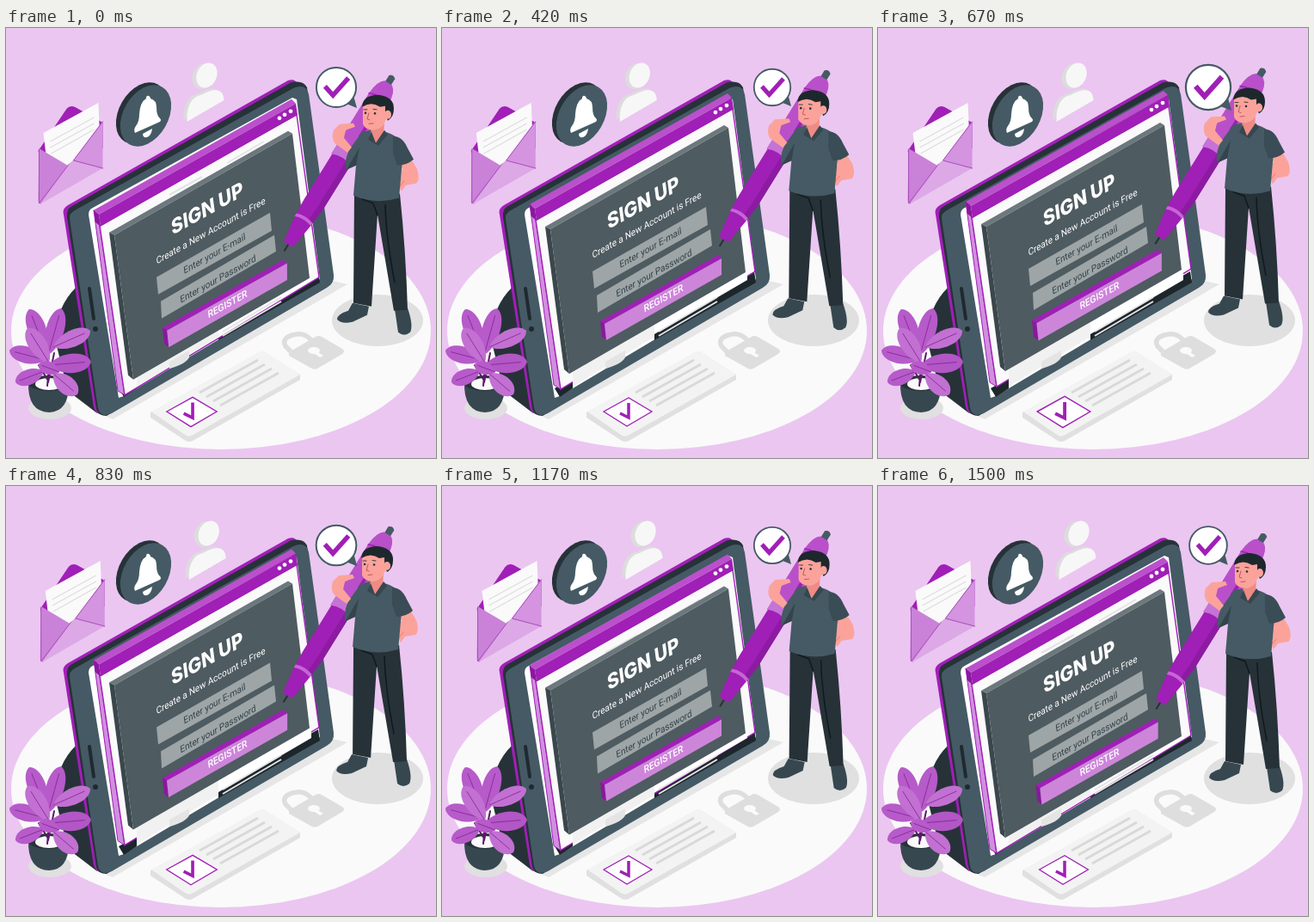
An HTML page for the animation above (1540 ms loop, 500 by 500 pixels).

```html
<!DOCTYPE html>
<html lang="en">
<head>
<meta charset="utf-8">
<title>Sign up</title>
<style>
html, body { margin: 0; width: 100%; height: 100%; overflow: hidden; background: #ebc6f1; }
svg { display: block; width: 100vw; height: 100vh; }
text { font-family: Roboto, sans-serif; font-size: 11px; fill: #fff; text-anchor: middle; }
.line { fill: none; stroke-linecap: round; stroke-linejoin: round; }
.purple { fill: #a01fb6; }
.dark { fill: #263238; }
.slate { fill: #455a64; }
.skin { fill: #fba39b; }
</style>
</head>
<body>
<svg viewBox="0 0 500 500">
  <rect width="500" height="500" fill="#ebc6f1"/>
  <ellipse cx="250" cy="352" rx="244" ry="138" fill="#fafafa"/>

  <g fill="#e0e0e0">
    <path d="M112 450 376 293 397 298 124 455Z" fill="#e6e6e6"/>
    <ellipse cx="432" cy="340" rx="53" ry="30"/>
    <ellipse cx="51" cy="442" rx="25" ry="13"/>
  </g>

  <!-- padlock -->
  <path d="M333 378 325 370Q320 361 333 357 345 353 353 361L361 368" class="line" stroke="#dedede" stroke-width="5.500"/>
  <path d="M329 377 360 359Q363 357 367 359L391 373Q395 376 391 379L362 396Q358 398 354 395L329 381Z" fill="#dedede"/>
  <ellipse cx="358" cy="375" rx="7" ry="4" fill="#fafafa"/>
  <path d="M360 375 369 381 365 383 356 377Z" fill="#fafafa"/>

  <!-- floor card -->
  <path d="M168 447 298 376 342 403V409L217 480Q213 482 209 480L168 453Z" fill="#e0e0e0"/>
  <path d="M169 446 294 377Q298 375 302 377L342 403 216 474Q212 476 208 473Z" fill="#f3f3f3"/>
  <g id="cardLines" stroke="#d9d9d9" stroke-width="3"></g>
  <g id="tickBox">
    <path d="M188 446 217 430 244 446 215 463Z" fill="#fff" stroke="#a01fb6" stroke-width="1.3"/>
    <path d="M207 448 217 453V436" fill="none" stroke="#a01fb6" stroke-width="3.5"/>
  </g>

  <!-- tablet -->
  <path d="M82 301Q58 324 57 362L72 422 106 448Z" class="dark"/>
  <path d="M67 217Q65 210 72 206L328 61Q336 58 340 66L345 80 116 450Q104 450 102 441Z" class="purple"/>
  <path d="M71 220Q70 211 76 207.500L331 63.500Q345 60 350 69L378 290 117 451Q107 451 105 443Z" class="dark"/>
  <path d="M74 222Q73 216 80 212L334 70Q349 64 352 77L381 287Q382 297 373 302L123 448Q110 454 107 442Z" class="slate"/>
  <path d="M97 303 102 338" class="line" stroke="#1f2a30" stroke-width="4"/>
  <circle cx="104" cy="350" r="3" fill="#1f2a30"/>
  <path d="M96 217Q96 211 101 209L333 81 338 83 365 292 137 428 131 430Z" fill="#fff"/>
  <path d="M131 419 152 407V419L137 429ZM247 350 363 283 365 296 247 363Z" fill="#1c262b"/>

  <g id="window">
    <path d="M102 212 109 230 138 427 130 422Z" fill="#d18fdf" stroke="#a01fb6"/>
    <path d="M109 230 338 101 364 290 138 427Z" fill="#fafafa" stroke="#a01fb6" stroke-width="1.4"/>
    <path d="M102 212 332 83 337 88 108 217Z" fill="#bb50cc"/>
    <path d="M108 217 337 88 339 101 110 231Z" class="purple"/>
    <path d="M102 212 108 217 110 231 104 226Z" fill="#8a189e"/>
    <g fill="#fff"><circle cx="318" cy="105" r="2.4"/><circle cx="324" cy="101" r="2.4"/><circle cx="331" cy="97" r="2.4"/></g>
  </g>
  <path d="M152 396 247 342V359L152 417Z" fill="#f1f1f1"/>
  <path d="M247 342 355 280V293L247 356Z" fill="#fff"/>
  <path d="M190 388 213 375V383Q209 391 190 396Z" fill="#e4e4e4"/>
  <path d="M257 157 300 132M190 194 228 173M252 353 320 313M252 358 320 318" stroke="#e4e4e4" stroke-width="2"/>

  <g id="panel">
    <path d="M120 238 328 120 333 123 126 241Z" fill="#6c787d"/>
    <path d="M120 238 126 241 148 409 142 404Z" fill="#3a474d"/>
    <path d="M126 241 333 123 353 291 148 409Z" fill="#4e5b60"/>
    <path d="M175 290 307 215 309 236 177 310ZM180 318 312 241 314 260 181 338Z" fill="#9da5a7"/>
    <g id="button">
      <path d="M184 348 321 271 325 275 189 351Z" class="purple"/>
      <path d="M184 348 189 351 191 370 186 366Z" fill="#8a189e"/>
      <path d="M189 351 325 275V294L191 370Z" fill="#cd85da"/>
    </g>
    <g id="labels"></g>
  </g>

  <!-- plant -->
  <path d="M26 412Q25 446 50 447 74 446 73 412Z" fill="#37474f"/>
  <ellipse cx="49.500" cy="413" rx="23.500" ry="9" class="dark"/>
  <ellipse cx="50" cy="414" rx="16" ry="7" fill="#fafafa"/>
  <path d="M48 416Q51 395 47 373M49 412 56 378M49 410 38 392" class="line" stroke="#5b1a68" stroke-width="2"/>
  <g id="leaves"></g>

  <!-- icons -->
  <g id="mail">
    <path d="M37 143 70 94Q74 89 80 92L112 110V140L45 170Z" class="purple"/>
    <path d="M43 122 107 87 109 134 76 164 47 156Z" fill="#fafafa"/>
    <path d="M51 132 102 104M51 139 102 111M52 146 102 118" stroke="#dedede" stroke-width="1.400"/>
    <path d="M38 140 75 162 40 205Q37 204 37 200Z" fill="#ca82d8"/>
    <path d="M112 108 76 156 112 164Z" fill="#d494e0"/>
    <path d="M39 205 74 157Q77 153 81 155L112 163Z" fill="#dca8e6"/>
    <path d="M38 141V204L73 158M112 109 78 154 112 163" class="line" stroke="#aa4dbd" stroke-width="1"/>
  </g>
  <ellipse cx="157.500" cy="99" rx="26" ry="38.500" transform="rotate(30 157.500 99)" class="dark"/>
  <ellipse cx="162.500" cy="102" rx="26" ry="38.500" transform="rotate(30 162.500 102)" class="slate"/>
  <path d="M150 122Q148 118 151 114 155 109 155 100 156 86 163 82 163 78 166 79 168 80 168 82 175 84 175 92 175 102 179 105 181 107 179 109ZM159 123 170 117Q169 125 164 127 159 128 159 123Z" fill="#fff"/>
  <g id="user">
    <g fill="#dcdcdc"><ellipse cx="229" cy="56" rx="12.500" ry="15.500" transform="rotate(24 229 56)"/><path d="M206 107V99Q209 78 224 76 248 62 250 82Z"/></g>
    <g fill="#f7f7f7"><ellipse cx="233" cy="55" rx="11.500" ry="15" transform="rotate(24 233 55)"/><path d="M210 109V101Q212 81 226 78 252 64 253 84Z"/></g>
  </g>

  <g id="man">
    <g transform="translate(325 257) rotate(-58.200)">
      <path d="M-3-1H9V1H-3Z" class="dark"/>
      <path d="M225-4H235Q239 0 235 4H225Z" class="slate"/>
      <path d="M6-4Q7-7 10-7L40-11 60-12H130V13H60L40 11 10 7Q6 6 6 4Z" class="purple"/>
      <path d="M42 5 60 6H130V13H60L42 11Z" fill="#8c1ba1"/>
      <path d="M38-11Q42 0 38 11H42Q46 0 42-11Z" fill="#c765d6"/>
      <path d="M122-13H206Q222-12 227-5V5Q222 13 206 13H122Q128 0 122-13Z" fill="#b950ca"/>
      <path d="M122-13H136Q142 0 136 13H122Q128 0 122-13Z" fill="#c573d4"/>
      <path d="M157 5H208" class="line" stroke="#a01fb6" stroke-width="4"/>
      <path d="M205-13Q211 0 205 13" class="line" stroke="#a01fb6" stroke-width="1.500"/>
    </g>
    <path d="M403 320 422 324 420 334 403 342Q390 345 385 339 385 333 398 329Z" fill="#37474f"/>
    <path d="M452 327 467 326Q474 346 470 354 463 360 456 354Z" fill="#37474f"/>
    <path d="M405 193H458Q465 260 467 328L451 329 432 217 425 324 404 320Z" class="dark"/>
    <path d="M432 218 427 204 414 199M441 206Q442 245 452 296" class="line" stroke="#10191d" stroke-width="1.500"/>
    <path d="M457 156 470 151 478 164Q482 177 477 181L465 183 460 190 457 185 453 189 451 185 446 186 448 177 455 171 452 163 456 160 462 167Z" class="skin"/>
    <path d="M453 184 459 177M458 184 463 178" class="line" stroke="#df7e79"/>
    <path d="M414 121 426 119 440 121Q457 124 462 142L457 198Q430 206 404 195L407 160 396 165Q392 158 399 142Z" class="slate"/>
    <path d="M407 160 411 139 396 165Z" fill="#33444c"/>
    <path d="M450 126Q461 126 467 140L474 153Q466 160 455 160L450 146Z" fill="#3a4c55"/>
    <path d="M397 145 382 134Q378 127 381 119L388 112 404 111 406 115 395 119 393 128 402 139Z" class="skin"/>
    <path d="M425 113 440 108 439 124 430 134 424 126Z" fill="#ee8b85"/>
    <path d="M425 121 430 134 440 119 444 124 433 137 421 130Z" fill="#37474f"/>
    <path d="M415 87 445 87 448 98 441 108Q439 117 428 119 418 119 415 112Z" class="skin"/>
    <path d="M414 92Q415 78 433 78 451 80 451 94 451 104 444 108L441 101 441 91 435 92Q425 85 414 92Z" fill="#1d282d"/>
    <ellipse cx="444" cy="101" rx="4" ry="5" class="skin"/>
    <path d="M416 95 420 95M427 94.500 431 95" class="line" stroke="#263238" stroke-width=".9"/>
    <circle cx="418" cy="99" r="1.300" class="dark"/><circle cx="429" cy="99.500" r="1.300" class="dark"/>
    <path d="M422 99 420 106 423 107M422 111.500 427 111" class="line" stroke="#b74f58" stroke-width=".9"/>
  </g>

  <g id="bubble">
    <path d="M396 87 406 91 403 80Z" class="slate"/>
    <circle cx="384" cy="69" r="21.200" fill="#fff" stroke="#455a64" stroke-width="1.800"/>
    <path d="M372 68 380.500 77.500 397 59" fill="none" stroke="#a01fb6" stroke-width="5"/>
  </g>
</svg>
<script>
const LOOP = 1540, LEAD = 60;
const el = id => document.getElementById(id);
const set = (id, transform) => el(id).setAttribute('transform', transform);

function label(x, y, text, style) {
  el('labels').innerHTML +=
    `<text transform="matrix(.873 -.488 .13 .99 ${x} ${y})" style="${style}">${text}</text>`;
}
label(235, 218, 'SIGN UP', 'font:800 23.500px Inter,sans-serif');
label(238.500, 239.500, 'Create a New Account is Free', 'font-size:11.100px');
label(243, 266, 'Enter your E-mail', 'fill:#344147');
label(247, 295.500, 'Enter your Password', 'fill:#344147');
label(258, 325, 'REGISTER', 'font-weight:500;font-size:11.500px');

for (let i = 0; i < 4; i++) {
  el('cardLines').innerHTML += `<path d="M${225 + i * 8} ${424 + i * 5} l68-38"/>`;
}

// A leaf bulges to both sides of the line from base to tip.
function leaf(x, y, tipX, tipY, width, color) {
  const dx = tipX - x, dy = tipY - y, len = Math.hypot(dx, dy);
  const nx = -dy / len * width, ny = dx / len * width;
  const side = k => `${x + dx * .25 + nx * k} ${y + dy * .25 + ny * k}`;
  const far = k => `${x + dx * .9 + nx * k} ${y + dy * .9 + ny * k}`;
  el('leaves').innerHTML +=
    `<path d="M${x} ${y}C${side(1)} ${far(1)} ${tipX} ${tipY}C${far(-1)} ${side(-1)} ${x} ${y}" fill="${color}"/>` +
    `<path d="M${x} ${y}L${x + dx * .85} ${y + dy * .85}" stroke="#842095" stroke-width=".8"/>`;
}
[
  [46, 375, 27, 327, 14, '#b65bc9'], [49, 380, 64, 326, 14, '#b65bc9'],
  [55, 371, 98, 352, 13, '#c270d2'], [46, 386, 4, 375, 13, '#b65bc9'],
  [44, 399, 11, 412, 12, '#b65bc9'], [55, 402, 83, 426, 14, '#c270d2'],
  [50, 392, 99, 388, 15, '#b257c5'], [50, 389, 25, 349, 14, '#c270d2'],
  [62, 400, 38, 391, 10, '#b65bc9']
].forEach(args => leaf(...args));

const scaleAt = (x, y, k) => `translate(${x} ${y}) scale(${k}) translate(${-x} ${-y})`;

function draw(now) {
  const s = (now + LEAD) % LOOP, p = s / LOOP;
  const lift = (1 - Math.cos(2 * Math.PI * p)) / 2;
  const beat = s < 960 ? Math.abs(Math.sin(Math.PI * s / 480)) : 0;
  const shake = 3.5 * Math.cos(10 * Math.PI * p) * Math.min(1, p * 10, (1 - p) * 10);

  set('window', `translate(0 ${-10 * lift})`);
  set('panel', `translate(0 ${-10 * lift})`);
  set('man', `translate(${-lift} ${-8.5 * lift})`);
  set('mail', `translate(${shake})`);
  set('user', `translate(${shake})`);
  set('button', scaleAt(255, 321, 1 + .07 * beat));
  set('bubble', scaleAt(384, 69, 1 + .23 * beat));
  set('tickBox', scaleAt(216, 446, 1 + .1 * beat));
}

const start = performance.now();
(function tick() {
  draw(performance.now() - start);
  requestAnimationFrame(tick);
})();
</script>
</body>
</html>
```
